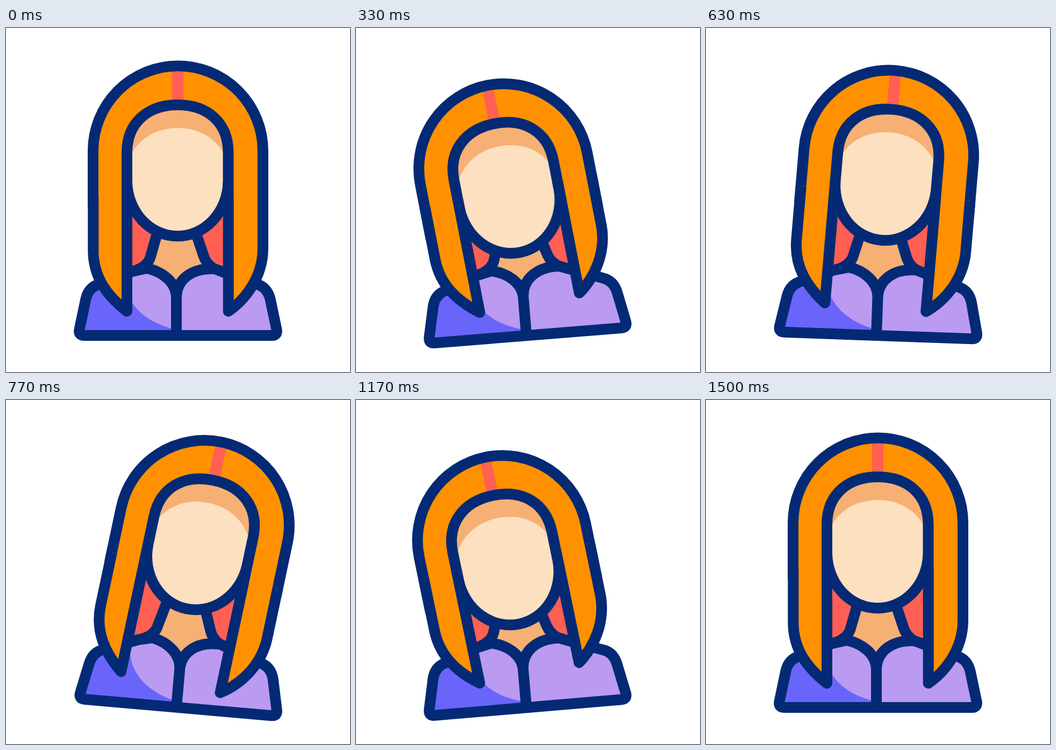
Write an HTML page that moves like this. It is 640 by 640 pixels and loops after 2 s.

```html
<!DOCTYPE html>
<html lang="en">
<head>
<meta charset="utf-8">
<title>Swaying avatar</title>
<style>
  html, body { margin: 0; width: 100%; height: 100%; overflow: hidden; background: #fff; }
  svg { display: block; width: 100%; height: 100%; }
  .line { stroke: #042a75; stroke-width: 20; stroke-linejoin: round; }
  .hair { fill: #ff9100; }
  .red { fill: #ff6053; }
  .shade { fill: #f6b073; }
  .skin { fill: #fce0bf; }
  .lilac { fill: #bb9af2; }
  .violet { fill: #6a65fa; }
  .none { fill: none; }
</style>
</head>
<body>
<svg viewBox="0 0 640 640">
  <g class="head">
    <path class="red" d="M225 290H414V472H225Z"/>
  </g>

  <g id="body">
    <path class="shade line" d="M292 345L268 428C263 442 250 449 235 453L317 500L404 454C390 452 374 442 368 425L341 345"/>
    <path class="lilac" d="M145 572Q134.5 572 136.5 561L148.5 504C152 489 160 481 172 477L235 453L262 447C290 453 317 472 317 502C317 470 343 446 388 448L404 454L468 477C480 481 488 490 491.5 504L503.5 561Q505.5 572 495 572Z"/>
    <path class="violet" d="M137 572L136.5 561L148.5 504C152 489 160 481 172 477L222 460C218 508 254 546 312 560L317 572Z"/>
    <path class="none line" d="M317 572V502C317 472 290 453 262 447L235 453L172 477C160 481 152 489 148.5 504L136.5 561Q134.5 572 145 572H495Q505.5 572 503.5 561L491.5 504C488 490 480 481 468 477L404 454L388 448C343 446 317 470 317 502"/>
  </g>

  <g class="head">
    <path class="shade" d="M225 287V232C225 176 264 143 319.5 143S413.5 176 413.5 232V287A94.3 103.6 0 0 1 225 287Z"/>
    <path class="skin" d="M228 245C245 205 280 186 319.5 186S394 205 411 245L413.5 287A94.3 103.6 0 0 1 225 287Z"/>
    <path class="none line" d="M225 287A94.3 103.6 0 0 0 413.5 287"/>
    <path class="hair line" d="M162 330V228.5A158 158 0 0 1 478 228.5V330H413.5V232C413.5 176 375 143 319.5 143S225 176 225 232V330Z"/>
    <path class="red" d="M309 81H330V133H309Z"/>
    <g id="ends">
      <path class="hair line" d="M162.3 314V414C162.3 465 190 500 225 527V314"/>
      <path class="hair line" d="M478 314V412C477 463 447 504 413.7 527V314"/>
    </g>
  </g>
</svg>
<script>
  const LOOP = 2000, FPS = 30;

  // Tracks of [frame, value], eased between neighbours
  const sway = [[0, 0], [12.1, -1], [22.9, 1], [33.9, -1], [45, 0]];
  const dip = [[0, 0], [11, 29.5], [23, -0.5], [33.3, 29.5], [45, 0]];
  const lift = [[0, 0], [12, -48], [23, 0], [34, -48], [45, 0]];

  const body = document.getElementById('body');
  const ends = document.getElementById('ends');
  const heads = document.querySelectorAll('.head');

  function valueAt(track, n) {
    const i = track.findIndex(key => key[0] > n);
    if (i < 0) return track[track.length - 1][1];
    const [n0, a] = track[i - 1], [n1, b] = track[i];
    const u = (n - n0) / (n1 - n0);
    return a + (b - a) * u * u * (3 - 2 * u);
  }

  function draw(ms) {
    const n = Math.floor((ms % LOOP + 5) * FPS / 1000);
    const s = valueAt(sway, n);
    const pose = `translate(0 ${valueAt(dip, n)}) rotate(${12 * s} 320 464)`;
    body.setAttribute('transform', `rotate(${5 * s} 320 572)`);
    heads.forEach(g => g.setAttribute('transform', pose));
    ends.setAttribute('transform', `translate(0 ${valueAt(lift, n)})`);
  }

  const start = performance.now();
  function tick() {
    draw(performance.now() - start);
    requestAnimationFrame(tick);
  }
  tick();
</script>
</body>
</html>
```
